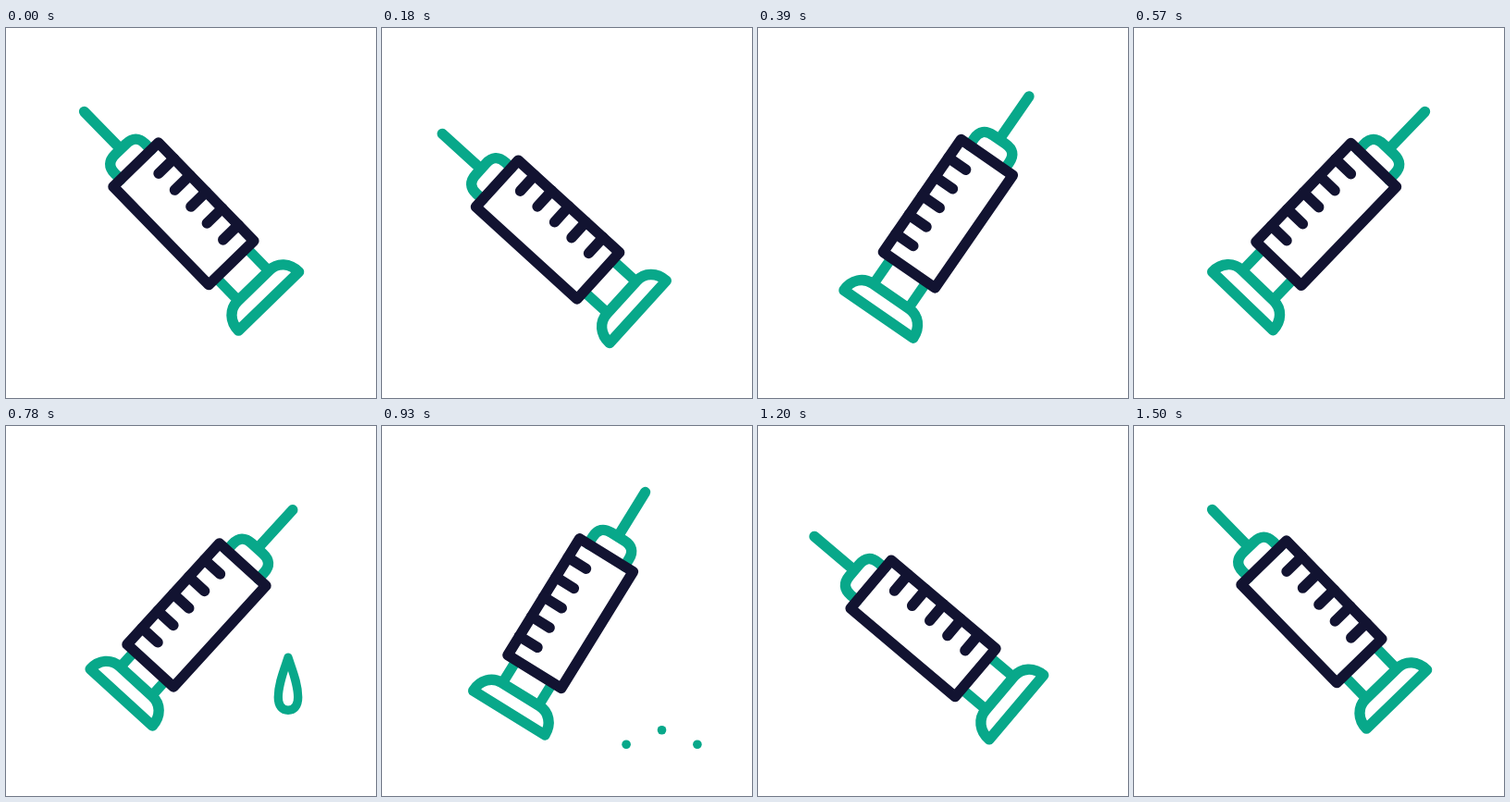
Animation, 400 px wide and 400 px high, one loop 1560 ms. Source, as an HTML page with a canvas:

```html
<!DOCTYPE html>
<html lang="en">
<head>
<meta charset="utf-8">
<title>Syringe</title>
<style>
  html, body { margin: 0; height: 100%; overflow: hidden; background: #fff; }
  canvas { display: block; width: 400px; height: 400px; }
</style>
</head>
<body>
<canvas id="stage" width="400" height="400"></canvas>
<script>
const ctx = document.getElementById('stage').getContext('2d');
const LOOP = 1560, GREEN = '#08a88a', NAVY = '#121331';
const HALF = 34; // half the barrel's width

let now = 0;
const rad = deg => deg * Math.PI / 180;
const progress = (start, end) => Math.min(1, Math.max(0, (now - start) / (end - start)));
const ease = (start, end) => {
  const u = progress(start, end);
  return u * u * (3 - 2 * u);
};
// Rises from 0 to 1, holds, and falls back
const pulse = (start, full, fade, end) => ease(start, full) - ease(fade, end);

function stroke(path, color, width = 11.4, cap = 'round') {
  ctx.strokeStyle = color;
  ctx.lineWidth = width;
  ctx.lineCap = cap;
  ctx.lineJoin = 'round';
  ctx.stroke(new Path2D(path));
}

function drawSyringe() {
  const swing = pulse(150, 450, 850, 1220);
  const windup = pulse(0, 150, 150, 450) + pulse(850, 1220, 1220, 1500);
  const press = pulse(530, 690, 800, 1060);
  const roll = 109 * (1 - pulse(195, 385, 965, 1185));

  ctx.save();
  ctx.translate(203.8 - 7.6 * swing - 12.3 * windup - 1.7 * press, 213 + 17 * windup + 4 * press);
  ctx.rotate(rad(-44.2 + 88.4 * swing - 6.3 * windup - 1.8 * press));
  ctx.translate(0, -17);

  // Needle and hub
  stroke('M0 -154V-98', GREEN);
  stroke('M-23 -74V-83Q-23 -97.5 -8 -97.5H8Q23 -97.5 23 -83V-74', GREEN);

  // Plunger
  const top = 108.5 - 11.5 * press, base = top + 23.5;
  stroke(`M-23 74V${top}M23 74V${top}`, GREEN, 11, 'butt');
  stroke(`M-45.5 ${base}C-45.5 ${base - 14} -36 ${top} -24 ${top}H24
    C36 ${top} 45.5 ${base - 14} 45.5 ${base}Z`, GREEN);

  // Barrel with its marks wrapped around it
  stroke(`M${-HALF} -74H${HALF}V74H${-HALF}Z`, NAVY);
  const from = HALF * Math.sin(rad(roll - 90));
  const to = HALF * Math.sin(rad(Math.min(90, roll - 19)));
  for (let mark = -50; mark <= 50; mark += 25) stroke(`M${from} ${mark}H${to}`, NAVY);
  ctx.restore();
}

function drawDrop() {
  const size = pulse(540, 660, 815, 865);
  if (size <= 0) return;
  const landed = 57 * ease(815, 865);
  ctx.save();
  ctx.translate(305, 93.5 + 234 * progress(560, 830) ** 2 + landed);
  ctx.scale(size, size);
  stroke('M0 0C5 15 10.7 29 10.7 43C10.7 53 6 57 0 57S-10.7 53 -10.7 43C-10.7 29 -5 15 0 0Z', GREEN, 9.3);
  ctx.restore();
}

function drawSplash() {
  const radius = 4.8 * pulse(850, 900, 1070, 1200);
  if (radius <= 0) return;
  const spread = 1 - (1 - progress(850, 1110)) ** 3;
  ctx.fillStyle = GREEN;
  for (const side of [-1, 0, 1]) {
    const rise = side ? 60.5 : 83.5;
    ctx.beginPath();
    ctx.arc(302.5 + 57 * side * spread, 385 - rise * spread, radius, 0, 2 * Math.PI);
    ctx.fill();
  }
}

function frame() {
  now = performance.now() % LOOP;
  ctx.fillStyle = '#fff';
  ctx.fillRect(0, 0, 400, 400);
  drawDrop();
  drawSplash();
  drawSyringe();
  requestAnimationFrame(frame);
}
frame();
</script>
</body>
</html>
```
